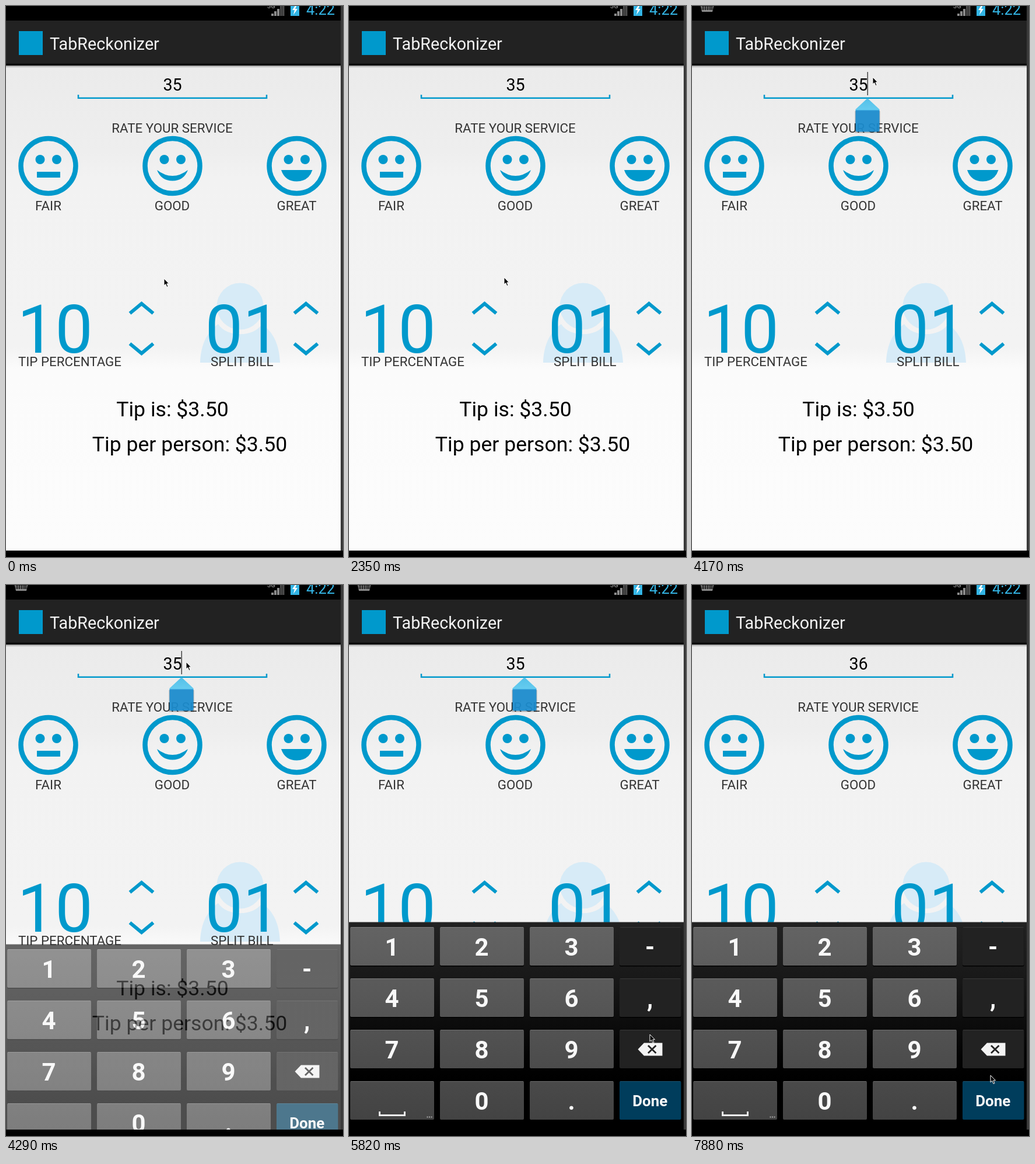
An HTML page that plays this animation: 578 px wide and 944 px high, repeating every 8000 ms.

```html
<!DOCTYPE html>
<html lang="en">
<head>
<meta charset="utf-8">
<title>Tip screen</title>
<style>
  html, body { margin: 0; width: 100%; height: 100%; overflow: hidden; background: #000; }
  svg { display: block; width: 578px; height: 944px; font-family: Roboto, "Noto Sans", sans-serif; }
  .mid { text-anchor: middle; }
  .label { font-size: 22.3px; fill: #333; }
  .big { font-size: 115px; fill: #09c; }
  .sum { font-size: 35.6px; }
  .key { font-size: 42px; font-weight: 700; fill: #f8f8f8; text-anchor: middle; }
  .chevron { fill: none; stroke: #09c; stroke-width: 6; }
</style>
</head>
<body>
<svg viewBox="0 0 578 944">
  <defs>
    <linearGradient id="page" gradientUnits="userSpaceOnUse" x1="0" y1="102" x2="0" y2="933">
      <stop offset="0" stop-color="#ebebeb"/>
      <stop offset=".18" stop-color="#eee"/>
      <stop offset=".23" stop-color="#f2f2f2"/>
      <stop offset=".58" stop-color="#f3f3f3"/>
      <stop offset=".625" stop-color="#fbfbfb"/>
      <stop offset="1" stop-color="#fcfcfc"/>
    </linearGradient>
    <linearGradient id="shade" x2="0" y2="1">
      <stop offset="0" stop-color="#000" stop-opacity=".35"/>
      <stop offset="1" stop-color="#000" stop-opacity="0"/>
    </linearGradient>
    <linearGradient id="board" gradientUnits="userSpaceOnUse" x1="0" y1="578" x2="0" y2="850">
      <stop offset="0" stop-color="#222"/>
      <stop offset=".3" stop-color="#1a1a1a"/>
      <stop offset=".85" stop-color="#030303"/>
      <stop offset="1" stop-color="#000"/>
    </linearGradient>
    <linearGradient id="keyFill" gradientUnits="userSpaceOnUse" x1="0" y1="586" x2="0" y2="916">
      <stop offset="0" stop-color="#636363"/>
      <stop offset="1" stop-color="#434343"/>
    </linearGradient>
    <linearGradient id="tip" x2="0" y2="1">
      <stop offset="0" stop-color="#4fbfe8"/>
      <stop offset="1" stop-color="#62cbf0"/>
    </linearGradient>
    <clipPath id="screen"><path d="M0 0H574V933H0Z"/></clipPath>
    <g id="face" fill="#09c">
      <circle r="47" fill="none" stroke="#09c" stroke-width="8.5"/>
      <circle cx="-14" cy="-11" r="8"/>
      <circle cx="14.5" cy="-11" r="8"/>
    </g>
    <g id="arrows" class="chevron">
      <path d="M-20 526.5L0 510L20 526.5M-20 578.5L0 595L20 578.5"/>
    </g>
  </defs>

  <path fill="#3a3a3a" d="M574 0h4v933h-4z"/>
  <g clip-path="url(#screen)">
    <path fill="url(#page)" d="M0 102H574V933H0Z"/>
    <path fill="#000" d="M0 0H574V25H0Z"/>
    <path fill="#222" d="M0 25H574V99H0Z"/>
    <path fill="#0c0c0c" d="M0 98.500H574V102H0Z"/>
    <path fill="url(#shade)" d="M0 102H574V106H0Z"/>

    <!-- status bar -->
    <g id="imeIcon" fill="#888">
      <path d="M14 -4H38L35 10H17Z"/>
      <path d="M16 1.500H36M16 5H36M19 -3V7M23 -3V7M27 -3V7M31 -3V7M34 -3V7" stroke="#000" stroke-width="1.100"/>
    </g>
    <text x="448" y="4" font-size="11" font-weight="700" fill="#777">3G</text>
    <path fill="#8a8a8a" d="M455 13h4v4h-4zM460 9h4v8h-4zM465 5h4v12h-4z"/>
    <path fill="#4a4a4a" d="M470 0h3.500v17h-3.500zM474 -3h3.500v20h-3.500z"/>
    <path fill="#33b5e5" d="M488 -2h15v19h-15z"/>
    <path fill="#fff" d="M497 -2l-6 9h4l-2 8 7-10h-4l3-7z"/>
    <text x="515" y="14.500" font-size="25.500" fill="#33b5e5">4:22</text>

    <!-- action bar -->
    <path fill="#09c" d="M22 43h41v41h-41z"/>
    <text x="75" y="75" font-size="28.700" fill="#f3f3f3">TabReckonizer</text>

    <!-- amount -->
    <text id="amount" class="mid" x="285.500" y="144.500" font-size="28.700">35</text>
    <path fill="none" stroke="#09c" stroke-width="2.500" d="M124 152V157.700H447V152"/>
    <path id="caret" fill="#444" d="M300.500 113h1.500v40h-1.500z"/>

    <!-- rating -->
    <text class="label mid" x="285" y="216.500">RATE YOUR SERVICE</text>
    <use href="#face" x="72.500" y="274"/>
    <use href="#face" x="285.500" y="274"/>
    <use href="#face" x="498.500" y="274"/>
    <path fill="#09c" d="M53 284h40v10h-40z"/>
    <path fill="#09c" d="M259 281Q285.500 301 312 281Q305 299.500 285.500 299.500Q266 299.500 259 281Z"/>
    <path fill="#09c" d="M472 281H525.500Q519 300.500 498.700 300.500Q478.500 300.500 472 281Z"/>
    <text class="label mid" x="72.500" y="349.500">FAIR</text>
    <text class="label mid" x="285" y="349.500">GOOD</text>
    <text class="label mid" x="498.500" y="349.500">GREAT</text>

    <!-- counters -->
    <g fill="#d7ebf7">
      <circle cx="401.500" cy="514.500" r="40"/>
      <path d="M333 611C334 580 345 558 364 545C378 568 425 568 439 545C458 558 469 580 470 611Z"/>
    </g>
    <text class="big" x="19.500" y="593.500">10</text>
    <text class="big" x="341.500" y="593.500">01</text>
    <use href="#arrows" x="232.500"/>
    <use href="#arrows" x="514.500"/>
    <text class="label" x="21" y="617">TIP PERCENTAGE</text>
    <text class="label" x="351" y="617">SPLIT BILL</text>
    <text class="sum mid" x="285.500" y="703">Tip is: $3.50</text>
    <text class="sum mid" x="315" y="763">Tip per person: $3.50</text>

    <g id="handle">
      <path fill="#000" opacity=".25" d="M279.500 180h43v37.500h-43z"/>
      <path fill="url(#tip)" opacity=".97" d="M301 158L321.500 177V179H280.500V177Z"/>
      <path fill="#1c8fd2" opacity=".92" d="M280.500 178.500h41v34q0 3-3 3h-35q-3 0-3-3z"/>
    </g>

    <g id="keyboard">
      <path fill="url(#board)" d="M0 578H574V990H0Z"/>
      <path fill="#333" d="M0 577.500H574V578.500H0Z"/>
      <g id="keys"></g>
      <path fill="none" stroke="#eee" stroke-width="3" d="M52.500 902V908.500H95.500V902"/>
      <path fill="#aaa" d="M133.500 910.500h2v2h-2zM137 910.500h2v2h-2zM140.500 910.500h2v2h-2z"/>
      <path fill="#f3f3f3" d="M495.500 795.500L506 784.500H537.500V806.500H506Z"/>
      <path stroke="#222" stroke-width="2.800" d="M513 789L526.500 802M526.500 789L513 802"/>
    </g>

    <path id="pointer" fill="#000" stroke="#fff" stroke-width="1" d="M0 0V12L2.800 9.500L5 14.500L7 13.600L4.900 8.800H8.500Z"/>
  </g>
</svg>
<script>
const LOOP = 8000;
const $ = id => document.getElementById(id);

function add(parent, tag, attrs, text = "") {
  const el = document.createElementNS("http://www.w3.org/2000/svg", tag);
  for (const name in attrs) el.setAttribute(name, attrs[name]);
  el.textContent = text;
  parent.append(el);
}

// " " marks keys whose symbols are drawn as paths
const rows = [["1", "2", "3", "-"], ["4", "5", "6", ","], ["7", "8", "9", " "], [" ", "0", ".", "Done"]];
rows.forEach((row, r) => row.forEach((label, c) => {
  const x = 2 + c * 154, y = 586 + r * 88;
  const width = c < 3 ? 144 : 105.5, done = label === "Done";
  const fill = done ? "#003d5c" : c < 3 ? "url(#keyFill)" : "#222";
  const box = { x, width, rx: 2 };
  add($("keys"), "rect", { ...box, y: y + 1.5, height: 66, fill: "#000" });
  add($("keys"), "rect", { ...box, y, height: 66, fill });
  add($("keys"), "rect", { x: x + 1, y, width: width - 2, height: 1, fill: "#fff", opacity: c < 3 ? .18 : .1 });
  add($("keys"), "text", {
    class: "key", x: x + width / 2 - .5, y: y + (done ? 43 : 48.5),
    style: done ? "font-size:26px" : ""
  }, label);
}));

// Each track holds [start time, ...values], sorted by time
const pointer = [
  [0, 271, 467], [2350, 266, 465], [2500, 255, 370], [2650, 261, 318], [2770, 275, 252],
  [2890, 291, 190], [3010, 303, 145], [3130, 311, 115], [3250, 314, 106], [3400, 310, 122],
  [4290, 309, 132], [4810, 364, 322], [4940, 421, 513], [5240, 543, 665], [5390, 559, 691],
  [5540, 543, 730], [5670, 517, 755], [5820, 516, 770], [5970, 510, 788], [6120, 507, 793],
  [6640, 505, 793], [6780, 413, 724], [6940, 408, 721], [7640, 434, 752], [7760, 489, 814],
  [7880, 512, 840]
];
const caretFlips = [400, 930, 1520, 1920, 2650, 3010, 3400, 4560, 5080, 5540, 6120, 7090, 7490, 7880];
const amount = [[0, "35", 0], [6520, "3", -8], [7490, "36", 0]];
const keyboard = [[0, 0, 0], [4290, .69, 38], [4410, .96, 0], [4560, 1, 0]];

const at = (track, t) => track.findLast(step => step[0] <= t);
const show = (id, on) => $(id).setAttribute("visibility", on ? "visible" : "hidden");
const move = (id, x, y) => $(id).setAttribute("transform", `translate(${x} ${y})`);

function draw(now) {
  const t = now % LOOP;
  const [, x, y] = at(pointer, t);
  const [, value, caretX] = at(amount, t);
  const [, alpha, drop] = at(keyboard, t);
  move("pointer", x, y);
  move("caret", caretX, 0);
  move("keyboard", 0, drop);
  $("keyboard").setAttribute("opacity", alpha);
  $("amount").textContent = value;
  show("caret", caretFlips.filter(flip => flip <= t).length % 2);
  show("handle", t >= 4050 && t < 6520);
  show("imeIcon", t >= 4170);
  requestAnimationFrame(() => draw(performance.now()));
}
draw(performance.now());
</script>
</body>
</html>
```
